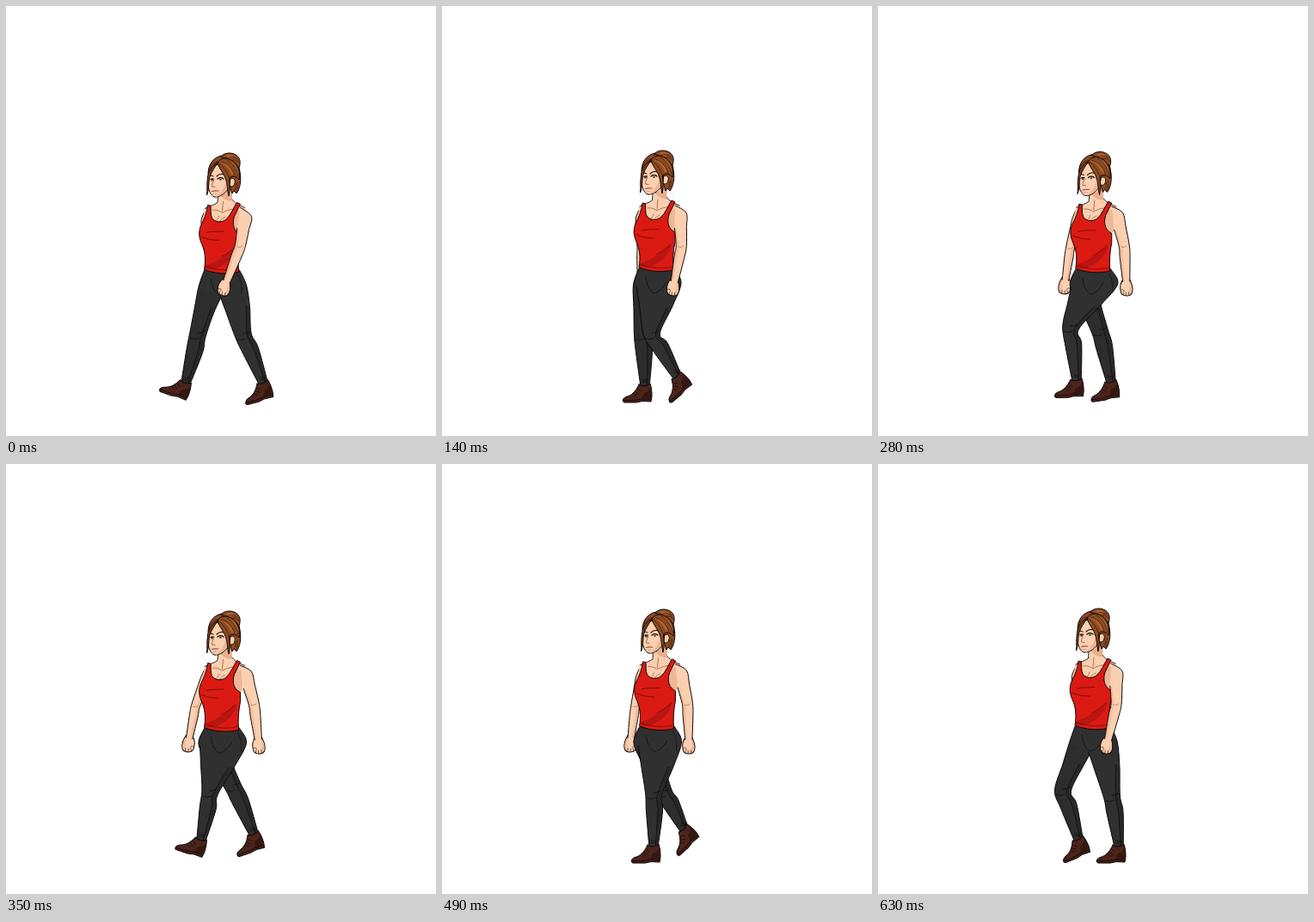
An HTML page that plays this animation: 500 px wide and 500 px high, repeating every 0.7 s.

```html
<!DOCTYPE html>
<html lang="en">
<head>
<meta charset="utf-8">
<title>Walk cycle</title>
<style>
  html, body { margin: 0; width: 100%; height: 100%; overflow: hidden; background: #fff; }
  svg { display: block; width: 100vw; height: 100vh; }
</style>
</head>
<body>
<svg id="stage" viewBox="0 0 500 500" fill="none" stroke="#0c0808" stroke-width="1"
     stroke-linejoin="round" stroke-linecap="round"></svg>
<script>
const STEP = 70;
const SKIN = '#fbd0b0', SHADE = '#e9ae8d', RED = '#db1a14', WINE = '#b91512';
const CLOTH = '#303030', DARK = '#282828', HAIR = '#8c4a23', GLOW = '#b0642f', SHOE = '#4b241b';

// Knee x, y, ankle x, y, shoe angle
const farLeg = [
  [223, 382, 209, 438, 20], [226, 382, 220, 442, 4], [233, 383, 236, 441, 0],
  [245, 383, 254, 441, 0], [258, 378, 271, 437, -8], [264, 375, 288, 430, -18],
  [263, 380, 288, 425, -33], [258, 382, 281, 424, -42], [231, 380, 267, 424, -40],
  [215, 380, 233, 436, -22]
];
const nearLeg = [
  [276, 383, 299, 438, -15], [264, 383, 288, 434, -27], [244, 382, 273, 430, -40],
  [224, 378, 250, 432, -25], [224, 374, 231, 435, -1], [237, 382, 227, 437, 18],
  [240, 384, 236, 443, 4], [246, 384, 246, 444, 0], [261, 385, 264, 445, 0],
  [272, 387, 280, 444, 0]
];
const nearHand = [254, 262, 269, 278, 289, 294, 291, 287, 277, 266];
const farHand = [240, 236, 231, 223, 217, 212, 214, 219, 230, 236];
const bob = [3, 2, 0, 0, 1.5, 3, 2, 1, 0, 0];

const mix = (a, b, t) => [a[0] + (b[0] - a[0]) * t, a[1] + (b[1] - a[1]) * t];
const unit = (x, y) => { const l = Math.hypot(x, y) || 1; return [x / l, y / l]; };
const dir = (a, b) => unit(b[0] - a[0], b[1] - a[1]);
const xy = p => p.map(n => n.toFixed(2)).join(' ');
const path = (d, attrs = '') => `<path d="${d}" ${attrs}/>`;
const fill = (d, color) => path(d, `fill="${color}" stroke="none"`);
const ink = (d, color) => path(d, `fill="${color}"`);
const line = (d, width = 0.7, color = '#0c0808') => path(d, `stroke="${color}" stroke-width="${width}"`);
const group = (transform, body) => `<g transform="${transform}">${body}</g>`;

// Smooth curve through the points
function spline(pts, start = 'M') {
  let d = start + xy(pts[0]);
  for (let i = 0; i < pts.length - 1; i++) {
    const p = pts[i], q = pts[i + 1], o = pts[i - 1] || p, r = pts[i + 2] || q;
    const c1 = [p[0] + (q[0] - o[0]) / 6, p[1] + (q[1] - o[1]) / 6];
    const c2 = [q[0] - (r[0] - p[0]) / 6, q[1] - (r[1] - p[1]) / 6];
    d += `C${xy(c1)} ${xy(c2)} ${xy(q)}`;
  }
  return d;
}

// Returns a function giving the limb edge at the given half widths
function edges(a, b, c) {
  const u = dir(a, b), v = dir(b, c), m = unit(u[0] + v[0], u[1] + v[1]);
  const stops = [[a, u], [mix(a, b, 0.45), u], [b, m], [mix(b, c, 0.32), v], [c, v]];
  return (widths, side) => stops.map(([p, d], i) =>
    [p[0] - side * d[1] * widths[i], p[1] + side * d[0] * widths[i]]);
}

const outline = (front, back) => spline(front) + spline([...back].reverse(), 'L');

// Filled limb with lines on its two sides only
const sleeve = (front, back, color) =>
  fill(outline(front, back), color) + line(spline(front) + spline(back), 1);

function shoe(x, y, angle) {
  return group(`translate(${x} ${y}) rotate(${angle})`,
    ink('M-7-1C-3 2 3 1 6-2C8 4 8 9 8 13L7 19L-3 18.500L-10 20H-24C-27 19-26 15-22 13.500C-16 12-11 8-7-1Z', SHOE) +
    fill('M-1 9C3 8 6 5 6.500 3L7 15L-4 16Z', '#35170f') +
    line('M-25 17.500C-18 18-11 18-4 16L7 16.500', 1, '#190a07') +
    line('M-14 9.500L-10 12M-11 7.500L-7 10M-8 4.500L-5 7', 0.7, '#190a07'));
}

function leg([kx, ky, ax, ay, angle], near, tx, ty) {
  const at = (x, y) => [x + tx, y + ty];
  const knee = [kx, ky], ankle = mix(knee, [ax, ay], 1.04);
  const hip = near ? at(260 + (kx - 240) * 0.12, 321) : at(241, 321);
  const edge = edges(hip, knee, ankle);
  const f = edge([17, 14, 9.5, 8.5, 5], 1).slice(2);
  const b = edge([16, 10, 9.5, 10.5, 5], -1);
  const seam = edge([10, near ? 9 : 5, 4.5, 5, 2], -1).slice(1);
  const groin = near ? at(224 + Math.max(0, kx - 240) * 0.55, 325) : at(222.5, 324);
  const rump = at(278, 322);
  const front = [...(near ? [] : [at(229, 305)]), groin, mix(groin, f[0], 0.45), ...f];
  const back = near
    ? [at(270, 305), rump, mix(rump, [b[2][0] + 3, b[2][1]], 0.45), ...b.slice(2)]
    : [at(258, 318), ...b.slice(1)];
  return sleeve(front, back, near ? CLOTH : '#2d2d2d') +
    fill(outline(seam, back.slice(-4).map((p, i) => mix(p, seam[i], 0.12))), DARK) +
    line(spline(seam), 0.7, '#090909') +
    line(`M${kx - 8} ${ky + 4}q5 3 10 0M${kx + 8} ${ky - 4}q-4 3-8 2`, 0.7, '#090909') +
    line(`M${ax - 4} ${ay - 7}q4 3 8 0M${ax - 4} ${ay - 4}q4 2 7-1`, 0.6, '#090909') +
    shoe(ax, ay, angle);
}

function fist(x, y, tilt, flip) {
  return group(`translate(${x} ${y}) rotate(${tilt}) scale(${flip} 1)`,
    ink('M-4-9C-7-5-8-1-7 4C-7 8-4 10 1 10C5 10 7 7 7 2C7-3 5-6 4-9Z', SKIN) +
    fill('M3-7C6-4 6.500 0 6 4C5 8 3 9 0 9C4 4 4-1 3-7Z', '#f0ba99') +
    line('M-6 3C-4 2-3 3-3 5M-4 9V6M-1 9.500V6M2.500 9.500V6', 0.7, '#4a2416'));
}

function arm(shoulder, elbow, hand, near) {
  const wrist = mix(hand, elbow, 0.14);
  const edge = edges(shoulder, elbow, wrist);
  const [sx, sy] = shoulder, [ex, ey] = elbow;
  const tilt = Math.atan2(ex - hand[0], hand[1] - ey) * 57.3;
  let front, back, tone;
  if (near) {
    front = edge([7, 6.5, 5.8, 5.6, 4], 1).slice(1);
    back = [[sx - 5, sy - 9], ...edge([8, 7.5, 6.3, 6.2, 4.2], -1)];
    tone = fill(outline(front, edge([0, 4, 2.5, 2, 1.5], 1).slice(1)), '#f3bf9f');
  } else {
    front = [[sx, sy - 14], ...edge([6.5, 6, 5, 5, 3.8], 1)];
    back = edge([6, 6, 5, 5, 3.8], -1);
    tone = fill(outline(edge([2, 2, 1.5, 1.5, 1], -1), back), '#f0ba99');
  }
  return fist(hand[0], hand[1], tilt * 0.6, near ? 1 : -1) +
    fill(outline(front, back), SKIN) + tone +
    line(spline(front) + spline(back), 1) +
    line(`M${ex - 3} ${ey + 1}q3 2 6-1`, 0.6, '#9a5a40');
}

const pelvis = fill('M230 303L270 304C275 312 277 318 276.500 325L264 332L246 335L225 326C226 316 229 309 230 303Z', CLOTH) +
  line('M237 315C238 324 241 331 247 334C253 332 258 327 261 321', 0.7, '#0b0b0b') +
  line('M268 310C272 317 273 324 272 332', 0.6, '#0b0b0b');

const torso =
  fill('M246 212L245 226C241 230 235 230 229 233L228 252L237 262H272L277 232C271 230 264 228 261 223L262 207Z', SKIN) +
  line('M245 219L244.500 226C241 229 235 230 230 233M261 222C264 227 269 229 276 232', 0.9) +
  fill('M246 216C251 218 257 213 262 207L261 224C256 225 251 222 246 216Z', SHADE) +
  fill('M264 238L275 234L273 262H269C264 256 262 248 264 238Z', '#efb797') +
  line('M239 235C243 234 247 236 250 238C255 235 261 233 266 234M251 225L250 236', 0.7, '#8c4c36') +
  line('M246 242C245 246 243 248 241 248M247 248C249 245 251 244 253 243', 0.7, '#8c4c36') +
  ink('M233 229.500C232 238 229 245 225 253C222 261 223 267 226 274C230 283 231 292 229 304' +
    'C241 309 256 310 269 307C268 295 269 284 271 274L271 263C264 260 261 252 264 242L271 228L267 226' +
    'C263 232 260 241 254 246C249 250 241 249 238 244C236 240 237 234 236.500 230Z', RED) +
  fill('M231 299C243 296 255 286 267 276C266 287 256 298 240 304L230 303Z', WINE) +
  line('M232 261C236 259.500 245 260 252 259.500M226 266C233 269 240 270 246 270', 0.7, '#5b0806') +
  line('M230 300C242 305 256 306 268 303M265 278C259 283 254 287 249 289', 0.6, '#5b0806');

const head =
  ink('M232 192C232 181 238 173 248 171C259 170 268 178 269 190C271 200 269 210 265 215L262 212L260 215C258 208 256 203 255 197Z', HAIR) +
  ink('M247 172C250 168 257 167 262 169C268 171 271 177 268 185C263 180 256 175 247 172Z', HAIR) +
  fill('M253 171C256 169 261 170 264 173C261 173 258 174 257 175Z', GLOW) +
  line('M254 174C258 172 262 172 266 175M259 177C262 175 265 176 268 179', 0.7, '#35170a') +
  ink('M234 188C232 194 231 199 232 203C232 211 235 217 239 219C246 220 253 214 257 207L257 195C251 190 246 185 243 181C239 183 236 185 234 188Z', SKIN) +
  fill('M254 194C256 199 257 203 256 207C252 213 246 218 241 219C248 213 253 207 254 194Z', '#edb493') +
  ink('M258 198C262 196 264 199 263 203C262 207 259 208 257 206Z', SKIN) +
  line('M233.500 193.500L238 195M242 195C245 192 248 192 251 193', 1.2, '#3a1a0d') +
  path('M235 198.300L238 198M243 198C245 196.500 248 196.500 250 198', 'stroke-width="1.3"') +
  path('M236 199.500h1M246 198.800h1', 'stroke="#33413c" stroke-width="1.800"') +
  line('M239 198C238 202 236 205 236.500 207L240 207.500', 0.8, '#8b4a34') +
  line('M236.500 212.500C239 211.500 241 212 244 212', 1.2, '#a94e43') +
  line('M238 215.500L242 215.300', 0.7, '#c9836c') +
  ink('M243 179C237 182 232 188 231.500 197C230 205 231.500 211 230.500 217C233 211 232.500 204 233.500 197C236 189 240 185 243 179Z', HAIR) +
  ink('M243 179C245 187 250 191 252 197C255 204 254 211 256 218C258 211 257 204 256.500 197C260 194 265 195 268 199C271 186 263 175 252 174C248 174 245 176 243 179Z', HAIR) +
  fill('M246 179C252 181 257 187 259 193L262 193C260 185 254 179 246 179Z', GLOW) +
  fill('M255 177C261 180 265 186 266 194L267 191C266 184 262 178 255 177Z', GLOW) +
  line('M245 180C250 184 254 190 256 196M248 178C255 180 261 187 263 194M254 176C261 180 265 186 267 195M243 179C238 183 235 188 234 194M243 178C239 178 236 181 234 185', 0.7, '#35170a') +
  line('M264 204C265 208 264 211 262 212M266 202C267 207 266 211 265 213', 0.7, '#35170a');

function pose(i) {
  const dy = bob[i], tx = dy * 0.5, ty = dy * 0.8;
  const farElbow = [229 + (farHand[i] - 226) * 0.6, 281];
  const nearElbow = [272 + (nearHand[i] - 254) * 0.4, 279];
  return arm([232 + tx, 246 + ty], farElbow, [farHand[i], 325], false) +
    leg(farLeg[i], false, tx, ty) +
    leg(nearLeg[i], true, tx, ty) +
    group(`translate(${tx} ${ty})`, pelvis + torso) +
    group(`translate(${dy} ${dy})`, head) +
    arm([276 + tx, 241 + ty], nearElbow, [nearHand[i], 327], true);
}

const stage = document.getElementById('stage');
const poses = bob.map((_, i) => pose(i));
const began = performance.now();
let shown = -1;

function tick() {
  const i = Math.floor((performance.now() - began) / STEP) % poses.length;
  if (i !== shown) stage.innerHTML = poses[shown = i];
  requestAnimationFrame(tick);
}
tick();
</script>
</body>
</html>
```
